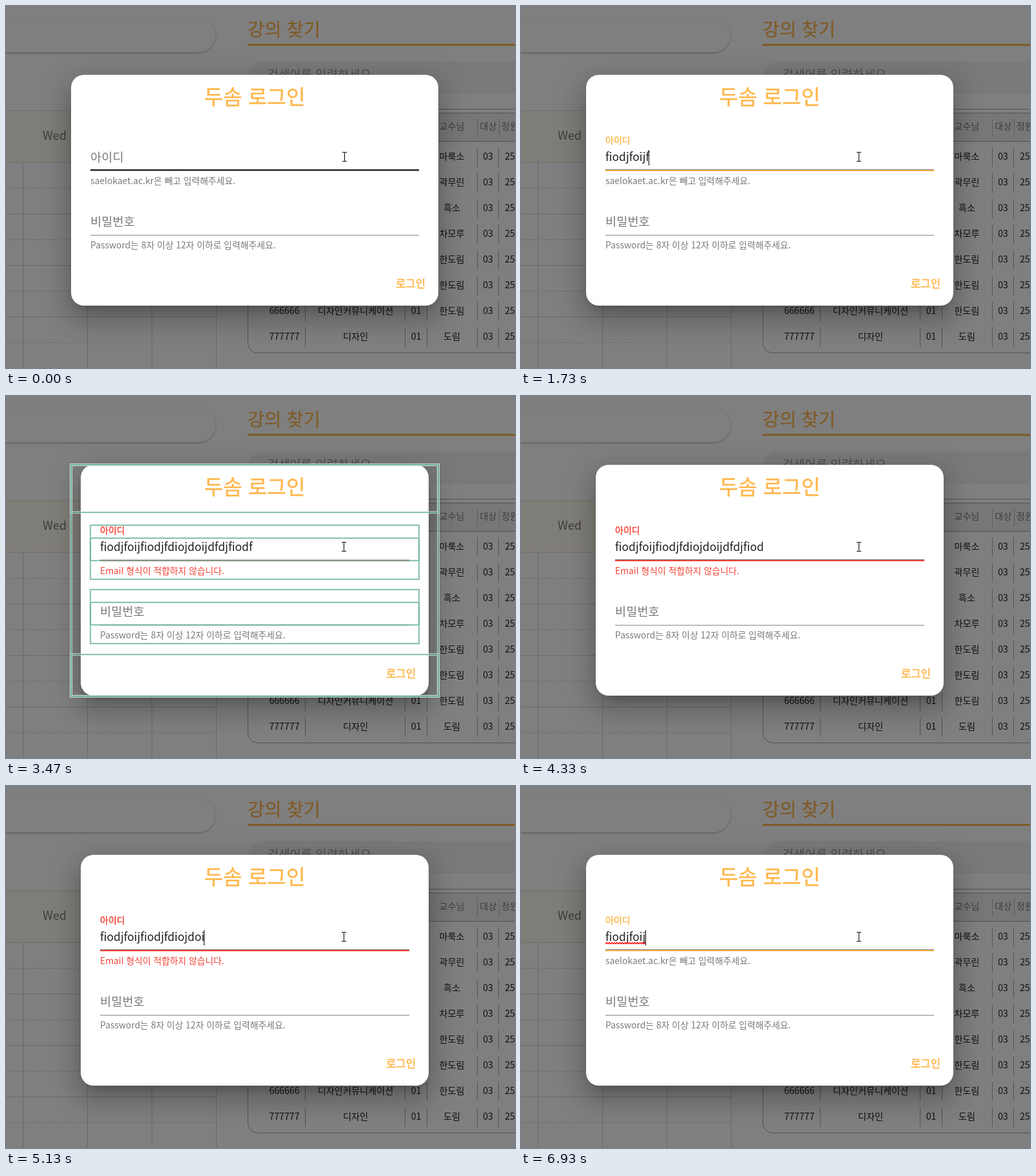
Animation, 790 px wide and 563 px high, one loop 7390 ms. Source, as an HTML page:

```html
<!DOCTYPE html>
<html lang="ko">
<head>
<meta charset="utf-8">
<style>
  html, body { margin: 0; width: 100%; height: 100%; overflow: hidden; }
  svg { display: block; width: 790px; height: 563px; background: #fff; }
  text { font-family: "Noto Sans CJK KR", "Noto Sans KR", "Noto Sans", sans-serif; white-space: pre; }
</style>
</head>
<body>
<svg id="stage" viewBox="0 0 790 563">
  <defs>
    <filter id="pillShadow" x="-20%" y="-50%" width="140%" height="200%"><feDropShadow dx="0" dy="1" stdDeviation="1.8" flood-opacity=".34"/></filter>
    <filter id="blur38" x="-30%" y="-30%" width="160%" height="160%"><feGaussianBlur stdDeviation="19"/></filter>
    <filter id="blur46" x="-30%" y="-30%" width="160%" height="160%"><feGaussianBlur stdDeviation="23"/></filter>
    <filter id="blur15" x="-30%" y="-30%" width="160%" height="160%"><feGaussianBlur stdDeviation="7.5"/></filter>
  </defs>
  <g id="page"></g>
  <rect width="790" height="563" opacity=".5"/>
  <g id="dialog"></g>
  <g id="highlight" fill="none"></g>
  <path id="pointer" fill="none" stroke="#000" d="M-3.5-7h3l.5.5l.5-.5h3M0-7v14M-3.5 7h3l.5-.5l.5.5h3"/>
</svg>
<script>
const LOOP = 7390;
const ORANGE = '#ffb74d', RED = '#f44336', GRAY = '#7a7a7a', INK = '#212121';
const CENTER = 386, WIDE = 570, NARROW = 540, TOP = 107, HEIGHT = 359;
const TYPED = 'fiodjfoijfiodjfdiojdoijdfdjfiodf';
const ID_HINT = 'saelokaet.ac.kr은 빼고 입력해주세요.';
const ID_ERROR = 'Email 형식이 적합하지 않습니다.';

const byId = id => document.getElementById(id);
const page = byId('page'), dialog = byId('dialog'), highlight = byId('highlight');

function set(node, attrs) {
  for (const key in attrs) node.setAttribute(key, attrs[key]);
  return node;
}
function add(parent, tag, attrs) {
  return parent.appendChild(set(document.createElementNS('http://www.w3.org/2000/svg', tag), attrs));
}
function label(parent, content, x, y, size, fill, attrs = {}) {
  const node = add(parent, 'text', { x, y, 'font-size': size, fill, ...attrs });
  node.textContent = content;
  return node;
}
const box = (parent, x, y, width, height, attrs) => add(parent, 'rect', { x, y, width, height, ...attrs });
const line = (d, stroke, attrs) => add(page, 'path', { d, stroke, fill: 'none', ...attrs });
const middle = { 'text-anchor': 'middle' };
// A thin outline stands in for a medium weight
const medium = (stroke, width) => ({ stroke, 'stroke-width': width });

function buildPage() {
  box(page, -60, 19, 385, 53, { rx: 26.5, fill: '#fff', filter: 'url(#pillShadow)' });

  box(page, 0, 162, 326, 81, { fill: '#fffcf0' });
  line('M0 162.5H326M0 243.5H326', '#ddd');
  label(page, 'Wed', 57, 208, 18, GRAY);
  for (let i = 0; i < 8; i++) {
    const y = 283.5 + i * 40;
    line(`M0 ${y}H326`, '#d5d5d5', i % 2 ? {} : { 'stroke-dasharray': '3 2' });
  }
  for (let x = 26.5; x < 330; x += 100) line(`M${x} 243V563`, '#d5d5d5');

  label(page, '강의 찾기', 375, 47, 28.5, ORANGE, medium(ORANGE, .3));
  box(page, 375, 59, 415, 3, { fill: ORANGE });
  box(page, 375, 86, 480, 50, { rx: 25, fill: '#f3f3f3' });
  label(page, '검색어를 입력하세요', 406, 114, 18.8, '#999');

  box(page, 375.5, 160.5, 480, 379, { rx: 15, fill: '#fff', stroke: '#a5a5a5' });
  box(page, 376, 166, 414, 44, { fill: '#efefef' });
  line('M376 166.5H790M376 210.5H790', '#a5a5a5');
  [['교수님', 692], ['대상', 748.5], ['정원', 782]].forEach(([s, x]) =>
    label(page, s, x, 192, 14.1, GRAY, middle));
  line('M731.5 175V203M765.5 175V203', '#bbb');

  const teachers = ['마룩소', '곽무린', '흑소', '차모루', '한도림', '한도림', '한도림', '도림'];
  teachers.forEach((teacher, i) => {
    const y = 234 + i * 40;
    const course = i === 6 ? '디자인커뮤니케이션' : '디자인';
    const cells = [[String(i).repeat(6), 432], [course, 542.5], ['01', 636.5], [teacher, 692], ['03', 748], ['25', 782]];
    for (const [s, x] of cells) label(page, s, x, y + 5, 14.2, INK, middle);
    for (const x of [464, 619, 653, 731, 764]) line(`M${x + .5} ${y - 14}v30`, '#aaa');
  });
}

buildPage();

// Material shadow layers: offset, spread, opacity, filter
const shadows = [[24, 3, .14, 'blur38'], [9, 8, .12, 'blur46'], [11, -7, .2, 'blur15']].map(([dy, spread, opacity, blur]) => ({
  spread, node: box(dialog, 0, TOP + dy - spread, 0, HEIGHT + spread * 2, { rx: 20, opacity, filter: `url(#${blur})` })
}));
const paper = box(dialog, 0, TOP, 0, HEIGHT, { rx: 20, fill: '#fff' });
label(dialog, '두솜 로그인', CENTER, 153, 32.2, ORANGE, { ...middle, ...medium(ORANGE, .4) });
const idLabel = label(dialog, '아이디', 0, 0, 0, GRAY);
const idText = label(dialog, '', 0, 241, 17.5, INK);
const squiggle = add(dialog, 'path', { fill: 'none', stroke: '#f00', 'stroke-width': 1.3 });
const caret = box(dialog, 0, 224, 1, 24, { fill: '#000' });
const idLine = box(dialog, 0, 254, 0, 1, {});
const idFocus = box(dialog, 0, 255, 0, 2, {});
const idHint = label(dialog, '', 0, 277, 13.9, GRAY);
const passLabel = label(dialog, '비밀번호', 0, 342, 18.7, GRAY);
const passLine = box(dialog, 0, 356, 0, 1, { fill: '#888' });
const passHint = label(dialog, 'Password는 8자 이상 12자 이하로 입력해주세요.', 0, 377, 13.9, GRAY);
const submit = label(dialog, '로그인', 0, 438, 16.7, ORANGE, { 'text-anchor': 'end', ...medium(ORANGE, .6) });

function outline(parent, x, y, right, bottom) {
  [[-1.5, '#f0f0f0', .6, 1], [1.5, '#f0f0f0', .6, 1], [0, '#63b19e', .75, 2]].forEach(([inset, stroke, opacity, width]) =>
    box(parent, x + inset, y + inset, right - x - inset * 2, bottom - y - inset * 2, { stroke, opacity, 'stroke-width': width }));
}
function outlineGroup(width, whole) {
  const group = add(highlight, 'g', {});
  const left = CENTER - width / 2, right = CENTER + width / 2;
  const field = y => {
    outline(group, left + 30, y, right - 30, y + 84);
    outline(group, left + 30, y + 20, right - 30, y + 55);
  };
  field(201);
  if (whole) {
    field(301);
    outline(group, left, 107, right, 467);
    outline(group, left, 107, right, 181);
    outline(group, left, 402, right, 467);
  }
  return group;
}
const flashes = [
  { node: outlineGroup(WIDE, false), spans: [[400, 660], [1330, 1600]] },
  { node: outlineGroup(WIDE, true), spans: [[3200, 3800]] },
  { node: outlineGroup(NARROW, true), spans: [[4800, 5070], [5870, 6430]] }
];
const caretSpans = [[400, 870], [1330, 3230], [3730, 4270], [4800, 6430], [6930, LOOP]];
const squiggleSpans = [[3870, 4330], [6400, LOOP]];

const within = (t, spans) => spans.some(([from, to]) => t >= from && t < to);
const show = (node, visible) => node.setAttribute('visibility', visible ? 'visible' : 'hidden');
const clamp = v => Math.max(0, Math.min(1, v));
const easeOut = v => 1 - (1 - clamp(v)) ** 3;
const mix = (a, b, k) => a + (b - a) * k;

function typedCount(t) {
  if (t < 1330) return 0;
  if (t < 4330) return Math.min(32, Math.floor(1.5 + (t - 1330) / 1400 * 31));
  return Math.max(9, 31 - Math.max(0, Math.floor((t - 4840) / 31)));
}

function zigzag(x, width) {
  let d = `M${x} 245.5`;
  for (let i = 2; i <= width; i += 2) d += `l2 ${i % 4 ? -2 : 2}`;
  return d;
}

function render(t) {
  const focused = t >= 400;
  const error = t >= 3200 && t < 5870;
  const accent = error ? RED : ORANGE;
  const narrow = easeOut((t - 3200) / 270) - easeOut((t - 5870) / 270);
  const width = mix(WIDE, NARROW, narrow);
  const left = CENTER - width / 2, x = left + 30, inner = width - 60;

  for (const { node, spread } of shadows) set(node, { x: left - spread, width: width + spread * 2 });
  set(paper, { x: left, width });
  for (const node of [idLabel, idText, idHint, passLabel, passHint]) set(node, { x });
  for (const node of [idLine, passLine]) set(node, { x, width: inner });
  set(submit, { x: left + width - 20 });

  const rise = easeOut((t - 400) / 200);
  set(idLabel, {
    y: mix(242, 214, rise), 'font-size': mix(18.7, 14, rise),
    fill: focused ? accent : GRAY, ...medium(accent, focused ? .4 : 0)
  });
  set(idLine, { height: focused ? 1 : 2.4, fill: focused ? GRAY : INK });
  set(idFocus, { x: CENTER - inner * rise / 2, width: inner * rise, fill: accent });
  idHint.textContent = error ? ID_ERROR : ID_HINT;
  set(idHint, { fill: error ? RED : GRAY });

  const count = typedCount(t);
  idText.textContent = TYPED.slice(0, count);
  const typedWidth = count ? idText.getComputedTextLength() : 0;
  set(caret, { x: Math.floor(x + typedWidth - .5) });
  show(caret, within(t, caretSpans));
  set(squiggle, { d: zigzag(x, typedWidth) });
  show(squiggle, within(t, squiggleSpans));

  for (const { node, spans } of flashes) show(node, within(t, spans));
  set(byId('pointer'), { transform: `translate(${focused ? 524.5 : 525.5} 234.5)` });
}

const start = performance.now();
function tick() {
  render((performance.now() - start) % LOOP);
  requestAnimationFrame(tick);
}
tick();
</script>
</body>
</html>
```
